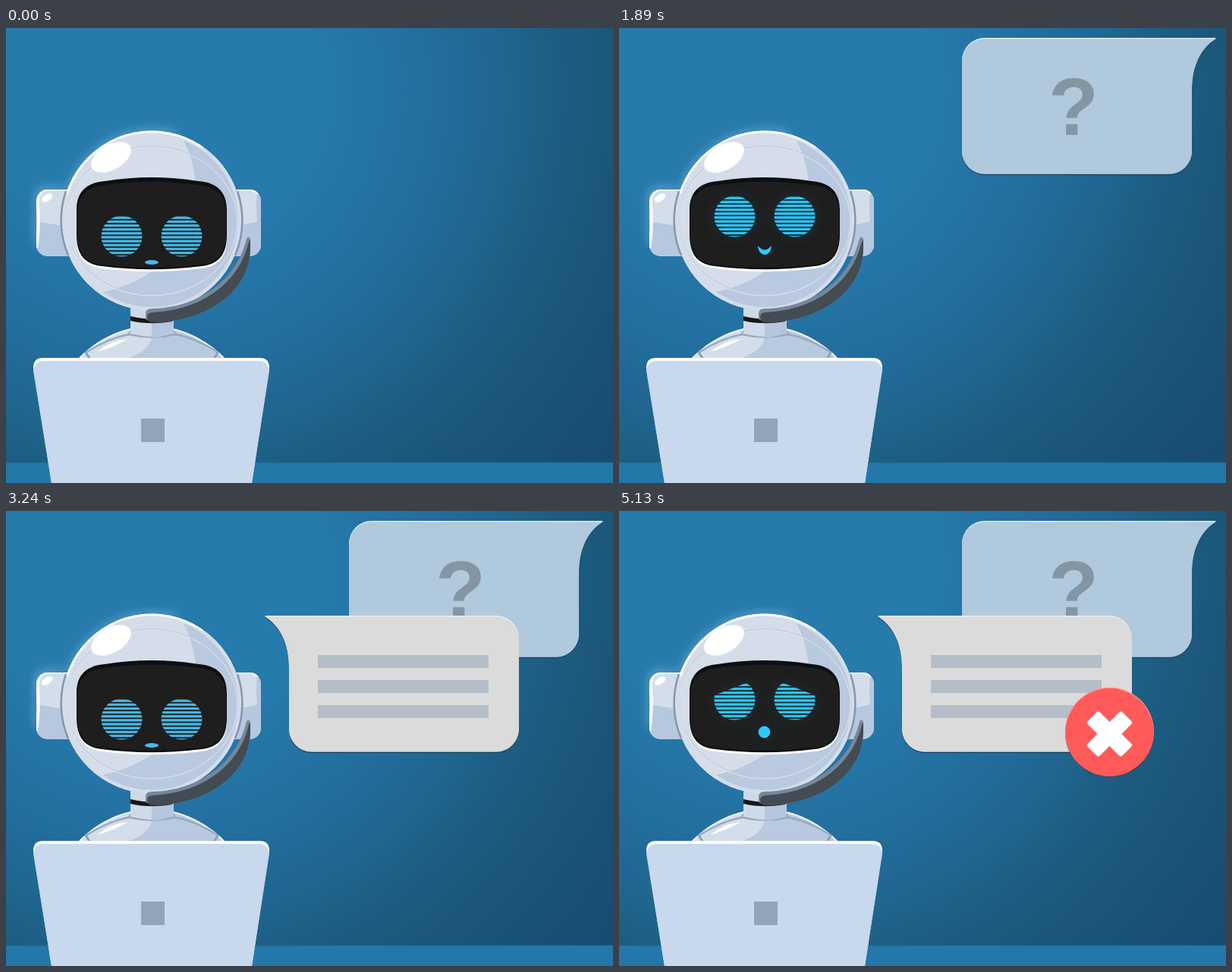
These frames come from a looping animation (800 by 600 pixels, 7 s). An HTML page:

```html
<!DOCTYPE html>
<html lang="en">
<head>
<meta charset="utf-8">
<title>Robot assistant</title>
<style>
html, body { margin: 0; width: 100%; height: 100%; overflow: hidden; background: #1d5a80; }
svg { display: block; width: 800px; height: 600px; }
text { font: bold 108px "Liberation Sans", Arial, sans-serif; text-anchor: middle; fill: #8496a3; }
.glow { filter: drop-shadow(0 0 9px #1a86b840); }
</style>
</head>
<body>
<svg id="stage" viewBox="0 0 800 600">
  <defs>
    <radialGradient id="wall" gradientUnits="userSpaceOnUse" cx="200" cy="80" r="750">
      <stop offset=".28" stop-color="#267aac"/>
      <stop offset=".48" stop-color="#226e9e"/>
      <stop offset=".62" stop-color="#1f658e"/>
      <stop offset=".7" stop-color="#1d5d81"/>
      <stop offset=".84" stop-color="#1a5478"/>
      <stop offset="1" stop-color="#194c73"/>
    </radialGradient>
    <pattern id="stripes" patternUnits="userSpaceOnUse" x="-30" y="-26.9" width="60" height="5.15">
      <rect y="1" width="60" height="3.2" fill="currentColor"/>
    </pattern>
    <filter id="soft" x="-30%" y="-30%" width="160%" height="160%"><feGaussianBlur stdDeviation="6"/></filter>
    <clipPath id="headClip"><circle cx="192" cy="254" r="118.5"/></clipPath>
    <clipPath id="earClip"><rect x="40" y="213" width="60" height="88" rx="15"/></clipPath>
    <clipPath id="bodyClip"><path id="torso" d="M95 436C120 410 155 393 192 393S264 410 289 436Z"/></clipPath>
    <path id="visor" d="M130 202Q192 192 254 202C280 204 291 218 291 240V273C291 299 280 310 262 313.500Q192 323 122 313.500C104 310 93 299 93 273V240C93 218 104 204 130 202Z"/>
  </defs>

  <rect width="800" height="600" fill="url(#wall)"/>
  <rect y="573" width="800" height="27" fill="#2478a9"/>
  <path d="M0 573H800" stroke="#1f668f"/>

  <!-- Ears -->
  <g fill="none" stroke="#9fd0ee" stroke-width="6" opacity=".55" filter="url(#soft)">
    <path d="M75 212H55Q41 212 41 228V285"/>
    <path d="M82 215A118 118 0 0 1 225 140"/>
  </g>
  <g clip-path="url(#earClip)">
    <path fill="#d4deea" d="M40 213H100V301H40Z"/>
    <path fill="#b6c8e0" d="M40 255L100 265V301H40Z"/>
    <path fill="none" stroke="#fff" stroke-width="4" d="M100 212.500H56Q40 213 42 235Q44 265 40 290"/>
    <ellipse cx="54" cy="224" rx="8" ry="4.500" transform="rotate(-32 54 224)" fill="#fff"/>
  </g>
  <path fill="#d4deea" d="M290 213H321A15 15 0 0 1 336 228V286A15 15 0 0 1 321 301H290Z"/>
  <path fill="#b6c8e0" d="M331 217Q336 221 336 229V286A15 15 0 0 1 321 301H290V265L331 255Q329 235 331 217Z"/>
  <path fill="none" stroke="#fff" stroke-width="2" d="M305 214H321Q328 214 332 219"/>

  <!-- Body and neck -->
  <use href="#torso" fill="#d4deea"/>
  <g clip-path="url(#bodyClip)">
    <path fill="#b9c9df" d="M192 408Q190 425 160 436H300V390H225Q222 408 192 408Z"/>
    <path fill="none" stroke="#eaf1f8" stroke-width="4" d="M95 436C120 410 155 393 192 393S264 410 289 436"/>
    <path fill="none" stroke="#99a9bd" stroke-width="2.5" d="M105 428Q135 409 162 404Q192 411 223 404Q250 409 280 428"/>
    <path fill="none" stroke="#8e9fb5" stroke-width="3" d="M104 426L111 437M280 426L274 437"/>
    <path fill="#fff" d="M120 427Q138 412 161 410Q142 421 120 427Z"/>
  </g>
  <path fill="#cfdae8" d="M164 362H221V402Q192 412 164 402Z"/>
  <path fill="#b6c6dc" d="M192 362H221V402Q206 408 192 408Z"/>
  <path fill="#171717" d="M164 380Q188 386 219 383V387Q188 392 164 386Z"/>
  <path fill="none" stroke="#99a9bd" stroke-width="2" d="M164 400L160 405M221 400L225 405"/>

  <!-- Head -->
  <circle cx="192" cy="254" r="118.5" fill="#d4dde9"/>
  <g clip-path="url(#headClip)">
    <path fill="#b9c9e0" d="M229 140Q246 165 250 205L192 321Q165 340 128 348Q155 375 192 375H312V140Z"/>
    <circle cx="192" cy="254" r="116.5" fill="none" stroke="#d4dde9" stroke-width="5"/>
    <ellipse cx="192" cy="254" rx="113" ry="98" fill="none" stroke="#c0cad7" stroke-width="1.5"/>
    <ellipse cx="192" cy="255" rx="113" ry="98" fill="none" stroke="#e6edf5" stroke-width=".8"/>
    <path fill="none" stroke="#fff" stroke-width="5" d="M79.500 218A118.500 118.500 0 0 1 260 157"/>
  </g>
  <path fill="none" stroke="#8796aa" stroke-width="2.500" d="M79 215A119.500 119.500 0 0 0 82 300M305 215A119.500 119.500 0 0 1 302 300"/>
  <ellipse cx="138.500" cy="170.500" rx="29" ry="16.500" transform="rotate(-30 138.500 170.500)" fill="#fff"/>
  <use href="#visor" fill="#fff" y="3"/>
  <use href="#visor" fill="#0d0f10"/>
  <path fill="#1e1e1e" d="M130 207Q192 198 254 207C278 209 290 222 290 243V272C290 297 279 308 262 311.500Q192 320 122 311.500C105 308 94 297 94 272V243C94 222 106 209 130 207Z"/>
  <g id="face"></g>

  <!-- Headset microphone -->
  <path fill="#77879a" d="M184 384V377Q184 370 192 370C248 369 302 338 317 278Q319 273 322 278V290C322 345 268 388 192 388Z"/>
  <path fill="#434b53" d="M186 381Q186 375 194 375C254 372 306 340 320 282L322 279V290C322 345 268 388 192 388Q186 387 186 381Z"/>

  <!-- Laptop -->
  <path fill="#fff" d="M49 435H334Q347 435 347 448L324 600H60L36 448Q36 435 49 435Z"/>
  <path fill="#c8d8ed" d="M50 439H333Q345 439 347 452L324 600H60L36 452Q38 439 50 439Z"/>
  <rect x="178" y="515" width="31" height="31" fill="#93a4b7"/>

  <g id="overlay"></g>
</svg>
<script>
const STEP = 270, LOOP = 7000;
// o: open, l: closed, H: happy, b: happy blink, s: sad
const MOODS = "olooLHbHoloooLHbHHbs".replace(/L/g, "l");
const $ = id => document.getElementById(id);

// Scale for something that pops in: small, overshoot, settled.
const pop = (k, start, small, large) => k < start ? 0 : [small, large][k - start] || 1;

function drawFace(mood) {
  const low = "ol".includes(mood), y = low ? 274.5 : 248.5;
  const eye = side => {
    const at = `transform="translate(${192 + side * 39.5} ${y}) scale(${side} 1)"`;
    if ("lb".includes(mood)) return `<ellipse ${at} rx="27" ry="1.6" fill="currentColor"/>`;
    const shape = mood === "s"
      ? "M26.5 -5.5A27 27 0 1 1 -15.5 -22Z"
      : "M-27 0a27 27 0 1 1 54 0a27 27 0 1 1 -54 0Z";
    return `<path ${at} d="${shape}" fill="url(#stripes)"/>`;
  };
  const mouth = low ? `<ellipse cx="192" cy="309" rx="9" ry="3" fill="currentColor"/>`
    : mood === "s" ? `<circle cx="191.5" cy="291.5" r="7.8" fill="currentColor"/>`
    : `<path d="M183 287Q192 298 201 287C200 303 184 303 183 287Z" fill="currentColor"/>`;
  $("stage").style.color = low ? "#49b9ea" : "#2dcaff";
  $("face").setAttribute("class", low ? "" : "glow");
  $("face").innerHTML = eye(-1) + eye(1) + mouth;
}

// Speech bubble that grows from its tail tip; the corners keep their radius.
function bubble(x, y, s, flip, fill, content) {
  if (!s) return "";
  const left = 32 * s, right = 335 * s, bottom = 178.5 * s, r = 30;
  const corner = (dx, dy) => `a${r} ${r} 0 0 1 ${dx * r} ${dy * r}`;
  const d = `M0 0H${right - r}${corner(1, 1)}V${bottom - r}${corner(-1, 1)}H${left + r}` +
    `${corner(-1, -1)}V${67 * s}C${left} ${36 * s} ${20 * s} ${12 * s} 0 0Z`;
  const layer = (dy, color) => `<path d="${d}" transform="translate(0 ${dy}) scale(${flip} 1)" fill="${color}"/>`;
  return `<g transform="translate(${x} ${y})">${layer(2.6, "#173f5c")}${layer(0, "#eaf3f9")}${layer(1.3, fill)}` +
    (s < 0.8 ? "" : `<g transform="scale(${s})">${content}</g>`) + "</g>";
}

function badge(s) {
  if (!s) return "";
  const bar = a => `<rect x="-32" y="-11" width="64" height="22" rx="3" transform="rotate(${a})"/>`;
  return `<g transform="translate(646.5 291) scale(${s})">
    <circle cy="1.3" r="58.5" fill="#4b3540"/><circle r="58.5" fill="#ff9c9c"/>
    <circle cy=".8" r="58" fill="#ff5a5a"/>
    <g transform="translate(0 3)"><g stroke="#e88" stroke-width="2">${bar(45) + bar(-45)}</g>
    <g fill="#fff">${bar(45) + bar(-45)}</g></g></g>`;
}

const bars = [52, 85, 118]
  .map(y => `<rect x="70" y="${y}" width="225" height="17" fill="#b5bec8"/>`).join("");
const question = `<text x="-188" y="128">?</text>`;

let shown = -1;
function frame(now) {
  const k = Math.min(Math.floor(now % LOOP / STEP), MOODS.length - 1);
  if (k !== shown) {
    shown = k;
    drawFace(MOODS[k]);
    $("overlay").innerHTML =
      bubble(787, 13, pop(k, 3, 0.62, 1.185), -1, "#b1c9dc", question) +
      bubble(341, 138, pop(k, 10, 0.62, 1.21), 1, "#dbdbdb", bars) +
      badge(pop(k, 15, 0.28, 1.31));
  }
  requestAnimationFrame(frame);
}
frame(performance.now());
</script>
</body>
</html>
```
